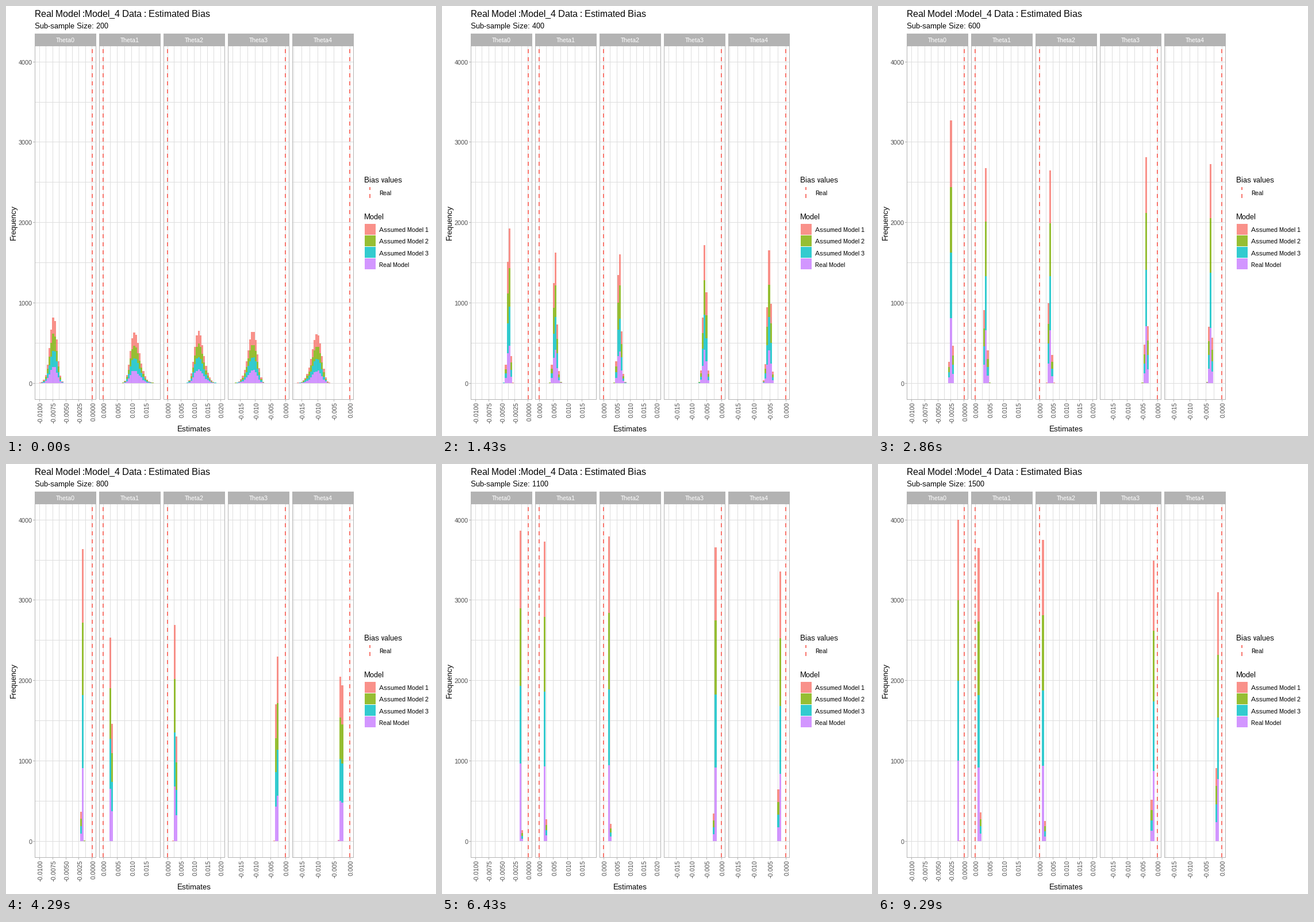
Animation, 748 px wide and 748 px high, one loop 10000 ms. Source, as a matplotlib script:

```python
import math

import matplotlib.pyplot as plt
import numpy as np
from matplotlib.animation import FuncAnimation
from matplotlib.collections import PolyCollection
from matplotlib.colors import to_rgba

plt.rcParams["font.family"] = "Liberation Sans"
plt.rcParams["text.hinting"] = "native"
plt.rcParams["text.hinting_factor"] = 1

SIZE = 748
LOOP_MS, TICK_MS = 10000, 40
SIZES = range(200, 1501, 100)

TOP, BOTTOM = 69, 684
PANEL_W, PITCH, LEFT = 105.7, 112.1, 50.55
BIN_W = PANEL_W / 1.1 / 30
BASE_Y, PX_PER_COUNT = 656.5, 0.13985
TOTAL = 4000

GRID, EDGE, TICK_TEXT = "#dedede", "#b3b3b3", "#4d4d4d"
RED = "#f8766d"
FILLS = [to_rgba(c, 0.8) for c in  # bottom to top
         ("#c77cff", "#00bfc4", "#7cae00", "#f8766d")]
MODELS = ["Assumed Model 1", "Assumed Model 2", "Assumed Model 3", "Real Model"]

# Bias shrinks as scale / n and its log-spread as spread / sqrt(n), in bins.
KNOTS = [200, 400, 600, 800, 1000, 1300, 1500]
PANELS = [
    dict(sign=-1, grid=11.43, step=0.0025, digits=4, spread=1.3,
         scale=[4174, 4156, 4156, 4138, 4132, 4143, 4154]),
    dict(sign=1, grid=12.42, step=0.005, digits=3, spread=2.04,
         scale=[3514, 3517, 3511, 3512, 3509, 3520, 3493]),
    dict(sign=1, grid=11.5, step=0.005, digits=3, spread=2.02,
         scale=[3462, 3482, 3489, 3486, 3484, 3499, 3462]),
    dict(sign=-1, grid=13.05, step=0.005, digits=3, spread=1.95,
         scale=[3560, 3556, 3553, 3554, 3549, 3563, 3542]),
    dict(sign=-1, grid=14.03, step=0.005, digits=3, spread=2.05,
         scale=[3600, 3606, 3611, 3610, 3620, 3626, 3604]),
]
for i, p in enumerate(PANELS):
    p["x0"] = LEFT + i * PITCH
    p["x1"] = p["x0"] + PANEL_W
    inset = PANEL_W / 22 + BIN_W / 2
    p["zero"] = p["x0"] + inset if p["sign"] > 0 else p["x1"] - inset

fig = plt.figure(figsize=(SIZE / 100, SIZE / 100), dpi=100, facecolor="white")
ax = fig.add_axes([0, 0, 1, 1])
ax.set_xlim(0, SIZE)
ax.set_ylim(SIZE, 0)
ax.axis("off")

back, front = [], []  # (corners, colour) pairs below and above the bars


def corners(x0, y0, x1, y1):
    return [(x0, y0), (x1, y0), (x1, y1), (x0, y1)]


def rect(layer, x, y, w, h, color):
    layer.append((corners(x, y, x + w, y + h), color))


def add_layer(boxes, z):
    verts, colors = zip(*boxes)
    layer = PolyCollection(verts, facecolors=colors, linewidths=0,
                           antialiaseds=False, zorder=z)
    ax.add_collection(layer, autolim=False)
    return layer


def text(x, y, s, px, color="black", ha="left", rotation=0):
    return ax.text(x, y, s, fontsize=px * 0.72, color=color, ha=ha,
                   va="baseline", rotation=rotation,
                   rotation_mode="anchor", zorder=6)


def count_y(count):
    return BASE_Y - count * PX_PER_COUNT


def dashes(x, top, bottom):
    for y in range(bottom, top, -14):
        start = max(y - 7, top)
        rect(front, x - 1, start, 2, y - start, RED)


def draw_panel(index, p):
    x0, x1 = int(p["x0"]), int(p["x1"])
    w = x1 - x0 + 1
    for count in range(0, 4001, 500):
        rect(back, x0, int(count_y(count)), w, 1, GRID)
    for k in range(9):
        x = p["zero"] + p["sign"] * k * p["grid"]
        if not p["x0"] < x < p["x1"]:
            continue
        rect(back, int(x), TOP, 1, BOTTOM - TOP, GRID)
        if k % 2 == 0:
            value = p["sign"] * (k // 2) * p["step"] if k else 0
            rect(back, int(x), BOTTOM + 1, 1, 3, EDGE)
            text(x + 5.5, 689.5, f"{value:.{p['digits']}f}", 11, TICK_TEXT,
                 ha="right", rotation=90)
    dashes(round(p["zero"]), TOP, BOTTOM)
    for y in (TOP, BOTTOM):
        rect(front, x0, y, w, 1, EDGE)
    for x in (x0, x1):
        rect(front, x, TOP, 1, BOTTOM - TOP + 1, EDGE)
    rect(front, x0, 48, w, TOP - 48, EDGE)
    text((p["x0"] + p["x1"]) / 2 - 0.5, 63, f"Theta{index}", 11, "white",
         ha="center")


def draw_legend():
    text(623, 307, "Bias values", 13)
    dashes(633, 315, 334)
    text(649, 329, "Real", 11)
    text(623, 371, "Model", 13)
    for i, (name, fill) in enumerate(zip(MODELS, FILLS[::-1])):
        y = 379.2 + 20.16 * i
        rect(back, 624, int(y), 19, 19, fill)
        text(649, round(y + 14), name, 11)


for i, p in enumerate(PANELS):
    draw_panel(i, p)
draw_legend()
for count in range(0, 4001, 1000):
    y = int(count_y(count))
    rect(back, 47, y, 3, 1, EDGE)
    text(45.5, y + 5, str(count), 11, TICK_TEXT, ha="right")
text(50, 19, "Real Model :Model_4 Data : Estimated Bias", 16)
subtitle = text(50, 39, "", 13)
text(327.5, 740, "Estimates", 13, ha="center")
text(17, 376.5, "Frequency", 13, ha="center", rotation=90)


def bin_shares(p, n):
    """Share of estimates in each bin, counted outwards from zero."""
    middle = math.log(np.interp(n, KNOTS, p["scale"]) / n)
    spread = p["spread"] / math.sqrt(n)
    cdf = [0.5 * (1 + math.erf((math.log(k + 0.5) - middle)
                               / (spread * math.sqrt(2)))) for k in range(30)]
    return np.diff(cdf)


def stacked_bars(n):
    rng = np.random.default_rng(n)
    boxes = []
    for p in PANELS:
        for k, share in enumerate(bin_shares(p, n), start=1):
            count = TOTAL * share
            if count < 2:
                continue
            mid = p["zero"] + p["sign"] * k * BIN_W
            xa, xb = int(mid - BIN_W / 2), int(mid + BIN_W / 2)
            noise = 0.6 * math.sqrt((1 - share) / (count / 4 + 4))
            parts = 1 + noise * rng.normal(size=4).clip(-1.5, 1.5)
            levels = np.append(0, np.cumsum(parts) / parts.sum()) * count
            ys = [int(count_y(v)) for v in levels]
            for ya, yb, fill in zip(ys, ys[1:], FILLS):
                if ya > yb:
                    boxes.append((corners(xa, yb, xb, ya), fill))
    return boxes


STACKS = [stacked_bars(n) for n in SIZES]
add_layer(back, 1)
bars = add_layer(STACKS[0], 3)
add_layer(front, 5)


def update(frame):
    # A tick shows the state reached by its end.
    tick_end = (frame + 1) * TICK_MS - 1
    i = tick_end * len(SIZES) // LOOP_MS
    subtitle.set_text(f"Sub-sample Size: {SIZES[i]}")
    verts, colors = zip(*STACKS[i])
    bars.set_verts(verts)
    bars.set_facecolor(colors)
    return bars, subtitle


anim = FuncAnimation(fig, update, frames=LOOP_MS // TICK_MS,
                     interval=TICK_MS, repeat=True, repeat_delay=0,
                     blit=False)
plt.show()
```
